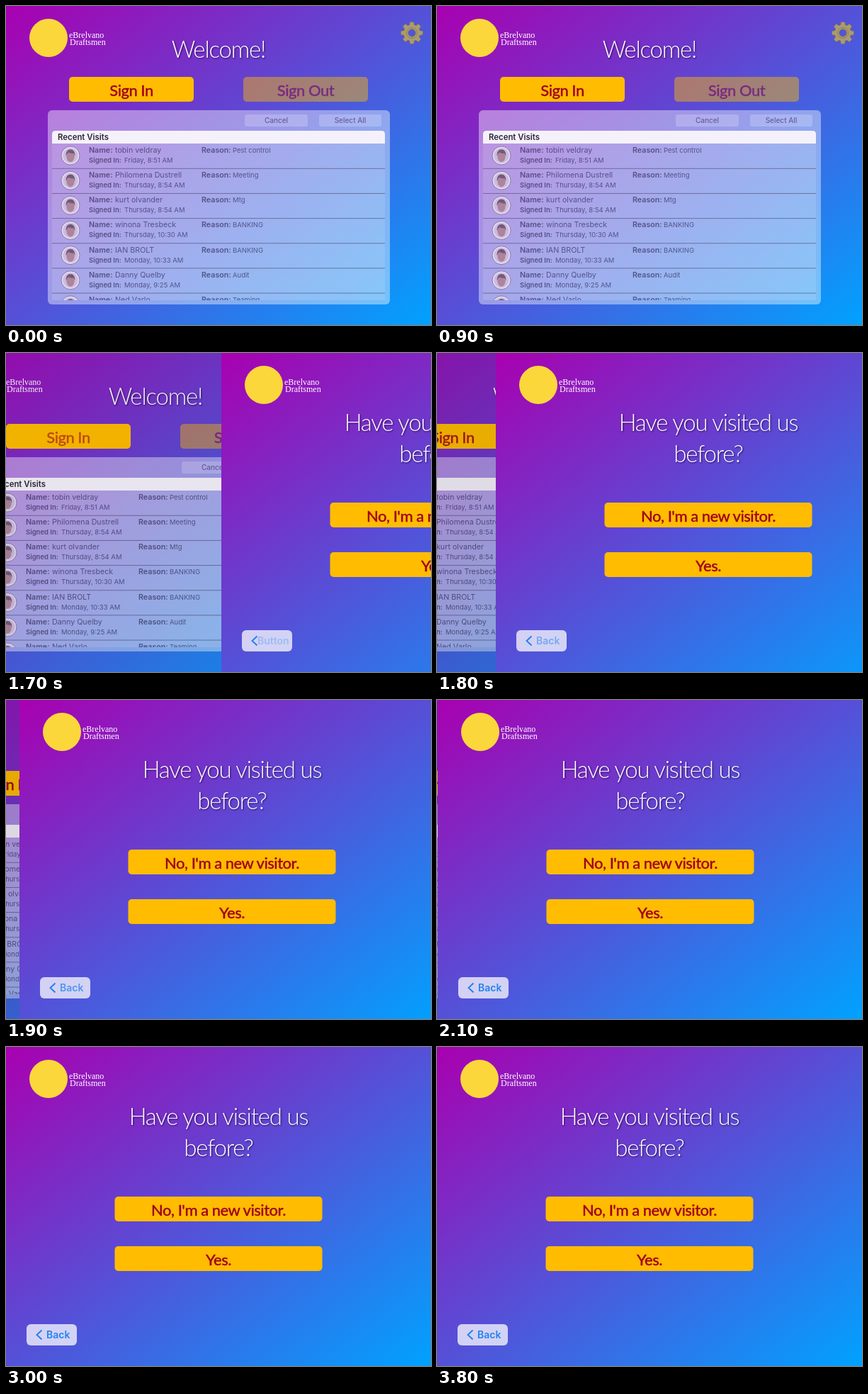
An HTML page for the animation above (3900 ms loop, 600 px wide and 450 px high).

```html
<!DOCTYPE html>
<html lang="en">
<head>
<meta charset="utf-8">
<title>Visitor sign-in</title>
<style>
  html, body { margin: 0; width: 100%; height: 100%; overflow: hidden; }
  svg { display: block; width: 100vw; height: 100vh; }
  .title { font: 300 33px Lato, sans-serif; letter-spacing: -1.2px; fill: #fff; text-anchor: middle;
           filter: drop-shadow(1px 1px 1px rgba(20, 0, 60, .75)); }
  .button { font: 500 22px Lato, sans-serif; letter-spacing: -.5px; fill: #a00018; stroke: #a00018;
            stroke-width: .3px; text-anchor: middle; }
  .brand { font: 12px "Liberation Serif", serif; fill: #fff; }
  .list { font-family: Inter, sans-serif; fill: #1c1440; fill-opacity: .58; }
  .big { font-size: 10.7px; }
  .small { font-size: 9.5px; }
  .label { font-weight: 600; }
  .tool { font: 500 10px Inter, sans-serif; fill: #2a1a60; fill-opacity: .55; text-anchor: middle; }
  .head { font: 600 11.4px Inter, sans-serif; fill: #2b2733; }
  .back { font: 600 14px Inter, sans-serif; fill: #2482f0; }
</style>
</head>
<body>
<svg id="stage" viewBox="0 0 600 450" xmlns="http://www.w3.org/2000/svg"></svg>
<script>
const LOOP = 3900, STEP = 100;
const PUSH_START = 1609, PUSH_RATE = 0.0182; // critically damped slide
const PARALLAX = 0.3;

const visits = [
  ["tobin veldray", "Friday, 8:51 AM", "Pest control"],
  ["Philomena Dustrell", "Thursday, 8:54 AM", "Meeting"],
  ["kurt olvander", "Thursday, 8:54 AM", "Mtg"],
  ["winona Tresbeck", "Thursday, 10:30 AM", "BANKING"],
  ["IAN BROLT", "Monday, 10:33 AM", "BANKING"],
  ["Danny Quelby", "Monday, 9:25 AM", "Audit"],
  ["Ned Varlo", "Monday, 9:10 AM", "Teaming"]
];

const text = (x, y, cls, str, extra = "") => `<text x="${x}" y="${y}" class="${cls}" ${extra}>${str}</text>`;
const box = (x, y, w, h, r, fill, extra = "") =>
  `<rect x="${x}" y="${y}" width="${w}" height="${h}" rx="${r}" fill="${fill}" ${extra}/>`;
const button = (x, y, w, label, id = "") =>
  box(x, y, w, 35, 5, "#ffbc00") + text(x + w / 2, y + 26.5, "button", label, id && `id="${id}"`);

const backdrop = box(0, 0, 600, 450, 0, "url(#sky)");
const brand = `<circle cx="60" cy="45" r="27" fill="#fbd73c"/>` +
  text(89, 45, "brand", "eBrelvano") + text(90, 55, "brand", "Draftsmen");

function gear(cx, cy) {
  let teeth = "";
  for (let a = 0; a < 360; a += 45)
    teeth += `<path d="M-3.6-10L-2.6-15.5H2.6L3.6-10Z" transform="rotate(${a})"/>`;
  return `<g transform="translate(${cx} ${cy})" fill="#ac9c6c" stroke="#77705f" stroke-width=".8">${teeth}
    <circle r="8.4" fill="none" stroke="#ac9c6c" stroke-width="6"/>
    <circle r="7.6" fill="none" stroke="#857a5c"/><circle r="5" fill="none"/></g>`;
}

function visitRow([name, time, reason], i) {
  return `<g transform="translate(0 ${i * 35.15})">
    <circle cx="91" cy="211" r="13" fill="#e3d9f1" stroke="#84749f" stroke-width=".9"/>
    <circle cx="91" cy="211" r="10.6" fill="#cbbbe2"/>
    <ellipse cx="91" cy="212.5" rx="5.6" ry="7.6" fill="#ad8499"/>
    <path d="M84.8 212C83 199 99 199 97.2 212L95.6 208Q91 208.5 88.5 206.5L86.2 208.5Z" fill="#745878"/>
    <g class="list">
      ${text(117, 207, "big label", "Name:")}${text(154, 207, "big", name)}
      ${text(117, 221, "small label", "Signed In:")}${text(167, 221, "small", time)}
      ${text(276, 207, "big label", "Reason:")}${text(320, 207, "small", reason)}
    </g>
    <path d="M65 229.3H535" stroke="#4b456c" stroke-opacity=".6"/></g>`;
}

const welcomePage = backdrop + brand + gear(573, 38) +
  text(300, 73, "title", "Welcome!") +
  button(89, 100, 176, "Sign In", "signIn") +
  `<g opacity=".45">${button(335, 100, 176, "Sign Out")}</g>` +
  box(59, 147, 483, 274, 6, "#fff", 'fill-opacity=".42"') +
  box(337, 153, 89, 17, 3, "#fff", 'fill-opacity=".2"') + text(381.5, 165, "tool", "Cancel") +
  box(442, 153, 88, 17, 3, "#fff", 'fill-opacity=".2"') + text(486, 165, "tool", "Select All") +
  `<g clip-path="url(#table)">` +
  box(65, 176, 470, 239, 0, "#e8e8ee", 'fill-opacity=".15"') +
  visits.map(visitRow).join("") +
  box(65, 176, 470, 18, 0, "#f5f1fb") + `</g>` +
  text(73, 188.5, "head", "Recent Visits");

const questionPage = backdrop + brand +
  text(300, 109.5, "title", "Have you visited us") + text(300, 153.5, "title", "before?") +
  button(153.5, 211, 293, "No, I'm a new visitor.") + button(153.5, 281, 293, "Yes.") +
  box(29, 391, 71, 30, 6, "#fff", 'fill-opacity=".74"') +
  `<path d="M50.5 399.5L43.5 406L50.5 412.5" fill="none" stroke="#1c7df2" stroke-width="1.8"/>` +
  text(57, 411, "back", "Back", 'id="back"');

stage.innerHTML = `<defs>
    <linearGradient id="sky" x1="0" y1="0" x2="1" y2="1">
      <stop stop-color="#a900b0"/><stop offset="1" stop-color="#00a2ff"/></linearGradient>
    <clipPath id="table"><path d="M65 415V181Q65 176 70 176H530Q535 176 535 181V415Z"/></clipPath>
  </defs>
  <g id="welcome">${welcomePage}${box(0, 0, 600, 450, 0, "#000", 'id="shade"')}</g>
  <g id="question">${questionPage}</g>`;

const part = id => document.getElementById(id);
const [welcome, question, shade, signIn, back] =
  ["welcome", "question", "shade", "signIn", "back"].map(part);
const clamp = v => Math.min(1, Math.max(0, v));

function draw(ms) {
  const t = Math.floor(ms / STEP) * STEP;
  const u = Math.max(0, t - PUSH_START) * PUSH_RATE;
  const left = Math.round(600 * (1 + u) * Math.exp(-u));
  const progress = 1 - left / 600;

  question.setAttribute("transform", `translate(${left} 0)`);
  welcome.setAttribute("transform", `translate(${Math.round(-600 * PARALLAX * progress)} 0)`);
  shade.setAttribute("opacity", 0.1 * progress);
  signIn.setAttribute("opacity", t < 1600 ? 1 : clamp(0.3 + (t - 1600) / 350));

  const placeholder = t < 1800;
  back.textContent = placeholder ? "Button" : "Back";
  back.setAttribute("x", placeholder ? 51 : 57);
  back.setAttribute("opacity", clamp(0.3 + (t - 1700) / 440));
}

const start = performance.now();
function tick() {
  draw((performance.now() - start) % LOOP);
  requestAnimationFrame(tick);
}
tick();
</script>
</body>
</html>
```
